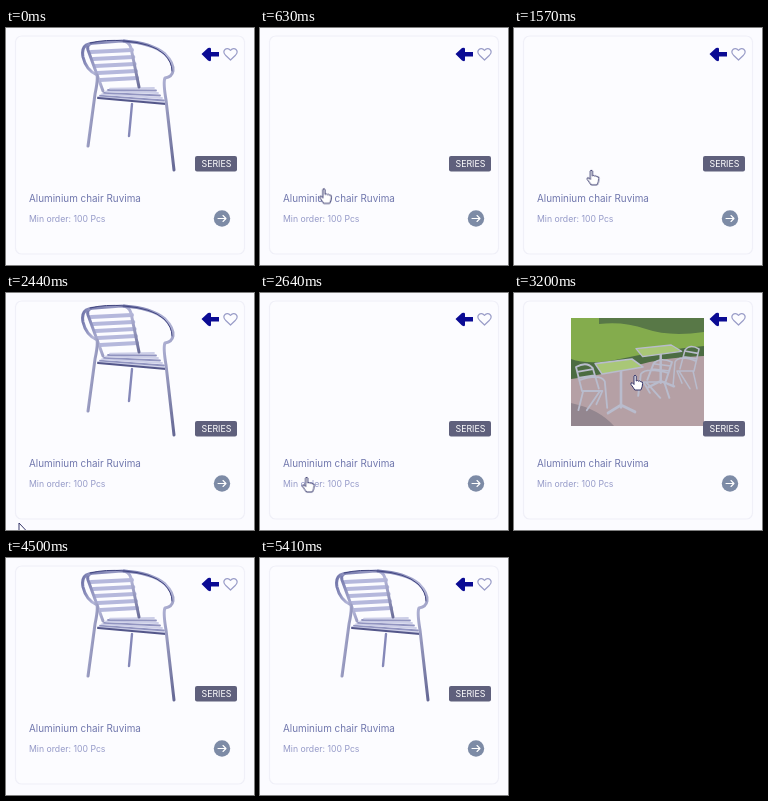
Recreate the animation shown at these times as an HTML page. Size 248 px wide and 237 px high, loop 5.45 s.

```html
<!DOCTYPE html>
<html lang="en">
<head>
<meta charset="utf-8">
<title>Product card</title>
<style>
  html, body { margin: 0; width: 100%; height: 100%; overflow: hidden; background: #fbfbff; }
  svg { display: block; width: 248px; height: 237px; }
  text { font-family: Inter, sans-serif; }
  .line { fill: none; stroke-linecap: round; stroke-linejoin: round; }
  #photo, #hand, #arrow { opacity: 0; }
</style>
</head>
<body>
<svg viewBox="0 0 248 237">
  <defs>
    <clipPath id="frame"><path d="M57 25.5H190V133H57Z"/></clipPath>
    <linearGradient id="metal" x2="1" y2="1">
      <stop offset="0" stop-color="#6f73a8"/>
      <stop offset=".5" stop-color="#b4b6d8"/>
      <stop offset="1" stop-color="#656894"/>
    </linearGradient>
    <g id="stool" class="line">
      <path d="M0 0L5 20H22L17 31M1 4L13 2M2 9L15 7M0 0Q9-5 14 1L19 18M3 11Q20 5 24 12L26 34M6 20L2 36M20 20L9 36"/>
    </g>
    <g id="table" class="line">
      <path d="M26 10V42M26 40L13 47M26 40L40 46" stroke-width="2.6"/>
      <path d="M0 4L37 0L48 7L7 13Z" fill="#a9c777" stroke-width="1.4"/>
    </g>
  </defs>

  <rect x="9.5" y="8" width="229" height="218" rx="6" fill="#fcfcff" stroke="#f0f0f8" stroke-width="1.2"/>

  <g id="chair" class="line">
    <path d="M126 76L123 108" stroke="#8588b8" stroke-width="2.4"/>
    <g id="slats"></g>
    <path d="M92 70L160 76" stroke="#54578a" stroke-width="2"/>
    <g stroke="url(#metal)" stroke-width="3">
      <path d="M97 63L82 22Q80 15 89 15L116 13Q123 13 125 20L133 59"/>
      <path d="M83 16Q75 18 77 29Q80 42 91 47Q92 52 89 66L82 118"/>
      <path d="M118 13Q146 15 159 26Q168 35 167 43Q166 49 159 50Q157 54 160 72L168 142"/>
    </g>
    <path d="M84 15Q100 11 118 13Q146 15 158 26Q166 34 166 43" stroke="#41457f"/>
  </g>

  <g id="photo" clip-path="url(#frame)">
    <path d="M57 25H190V133H57Z" fill="#b5a0a5"/>
    <path d="M57 25H190V63Q150 64 120 73T57 86Z" fill="#4c6c42"/>
    <path d="M57 25H190V53Q145 57 111 65T57 66Z" fill="#84ac4d"/>
    <path d="M85 25H190V39Q155 44 132 36T85 31Z" fill="#587847"/>
    <path d="M57 110Q85 116 100 133H57Z" fill="#93868f"/>
    <g stroke="#b9bccd" stroke-width="1.5">
      <use href="#table" transform="translate(122 52) scale(.95 .9)"/>
      <use href="#stool" transform="translate(185 56) scale(-1 1.1)"/>
      <use href="#stool" transform="translate(158 69) scale(-1.3 1)"/>
      <use href="#stool" transform="translate(62 74) scale(1.2)"/>
      <use href="#table" transform="translate(81 66) scale(1 1.15)"/>
    </g>
  </g>

  <path d="M195.5 26L202 20Q205 19 205 21V24H213V28.500H205V32Q205 34 202 32.500Z" fill="#0b0b94"/>
  <path class="line" d="M224.500 32L219.500 27.200C215.500 23 220.500 17.800 224.500 22.300C228.500 17.800 233.500 23 229.500 27.200Z" stroke="#9a9dc8" stroke-width="1.200"/>

  <rect x="189" y="128" width="42" height="15.500" rx="2" fill="#5f607c"/>
  <text x="195.500" y="139" font-size="8.800" fill="#fff">SERIES</text>

  <text x="23" y="173.500" font-size="9.900" fill="#7077ad">Aluminium chair Ruvima</text>
  <text x="23" y="194" font-size="8.700" fill="#959ac8">Min order: 100 Pcs</text>
  <circle cx="216" cy="190.500" r="8.200" fill="#7d8ba6"/>
  <path class="line" d="M212 190.500H220M217 187.500L220 190.500L217 193.500" stroke="#fff" stroke-width="1.100"/>

  <g id="cursor" fill="#fff" stroke="#35366a" stroke-linejoin="round">
    <path id="hand" d="M-1 1Q0-.8 1.200 1V6Q2.500 4.800 3.500 6.200Q5 5.200 5.800 6.800Q7.800 6.300 7.600 8.500Q7.600 12 5.800 15H-.2Q-2 12-4 9.500Q-4.500 7.200-2.600 7.800L-1 9.500Z"/>
    <path id="arrow" d="M0 0V13L3 10.300L5 15L7 14.200L5 9.600H9Z"/>
  </g>
</svg>

<script>
const LOOP = 5450, MOVE = 520, FADE = 110;
const visits = [{ enter: 380, leave: 1340 }, { enter: 2440, leave: 3215 }];
const byId = id => document.getElementById(id);

function slat(x1, y1, x2, y2, color, width) {
  const line = document.createElementNS('http://www.w3.org/2000/svg', 'line');
  const attrs = { x1, y1, x2, y2, stroke: color, 'stroke-width': width };
  for (const name in attrs) line.setAttribute(name, attrs[name]);
  byId('slats').append(line);
}

for (let i = 0; i < 5; i++) {
  const y = 24 + 7 * i;
  slat(85 + 2.3 * i, y, 126 + 1.3 * i, y - 2, '#b5b8dc', 4);
}
for (let i = 0; i < 7; i++) {
  slat(92 + 2 * i, 69 - 1.4 * i, 160 - 2 * i, 75 - 2.5 * i, i % 2 ? '#9194c0' : '#cdcfe8', 1.8);
}

// Builds one looping track; steps(visit) gives [time, style] pairs.
function play(id, idle, steps, easing = 'linear') {
  const all = [[0, idle], ...visits.flatMap(steps), [LOOP, idle]];
  const frames = all.map(([t, style]) => ({ offset: t / LOOP, easing, ...style }));
  byId(id).animate(frames, { duration: LOOP, iterations: Infinity });
}

const on = { opacity: 1 }, off = { opacity: 0 };
const at = (x, y) => ({ transform: `translate(${x}px, ${y}px)` });
const corner = at(13, 230), middle = at(121, 82);
const fade = (t, from, to, time = FADE) => [[t, from], [t + time, to]];

play('chair', on, v => [...fade(v.enter + 60, on, off), ...fade(v.leave + 260, off, on)]);
play('photo', off, v => [...fade(v.enter + 270, off, on), ...fade(v.leave + 10, on, off)]);
play('cursor', corner, v => [
  [v.enter, corner], [v.enter + MOVE, middle],
  [v.leave, middle], [v.leave + MOVE, corner]
], 'ease-in-out');

// The hand replaces the arrow while the cursor is over the card.
const over = v => [v.enter + 60, v.leave + MOVE - 60];
play('hand', off, v => {
  const [a, b] = over(v);
  return [...fade(a, off, on, 0), ...fade(b, on, off, 0)];
});
play('arrow', off, (v, i) => {
  const [a, b] = over(v);
  const first = i ? [] : fade(v.enter, off, on, 0);
  const last = i ? fade(v.leave + MOVE, on, off, 0) : [];
  return [...first, ...fade(a, on, off, 0), ...fade(b, off, on, 0), ...last];
});
</script>
</body>
</html>
```
